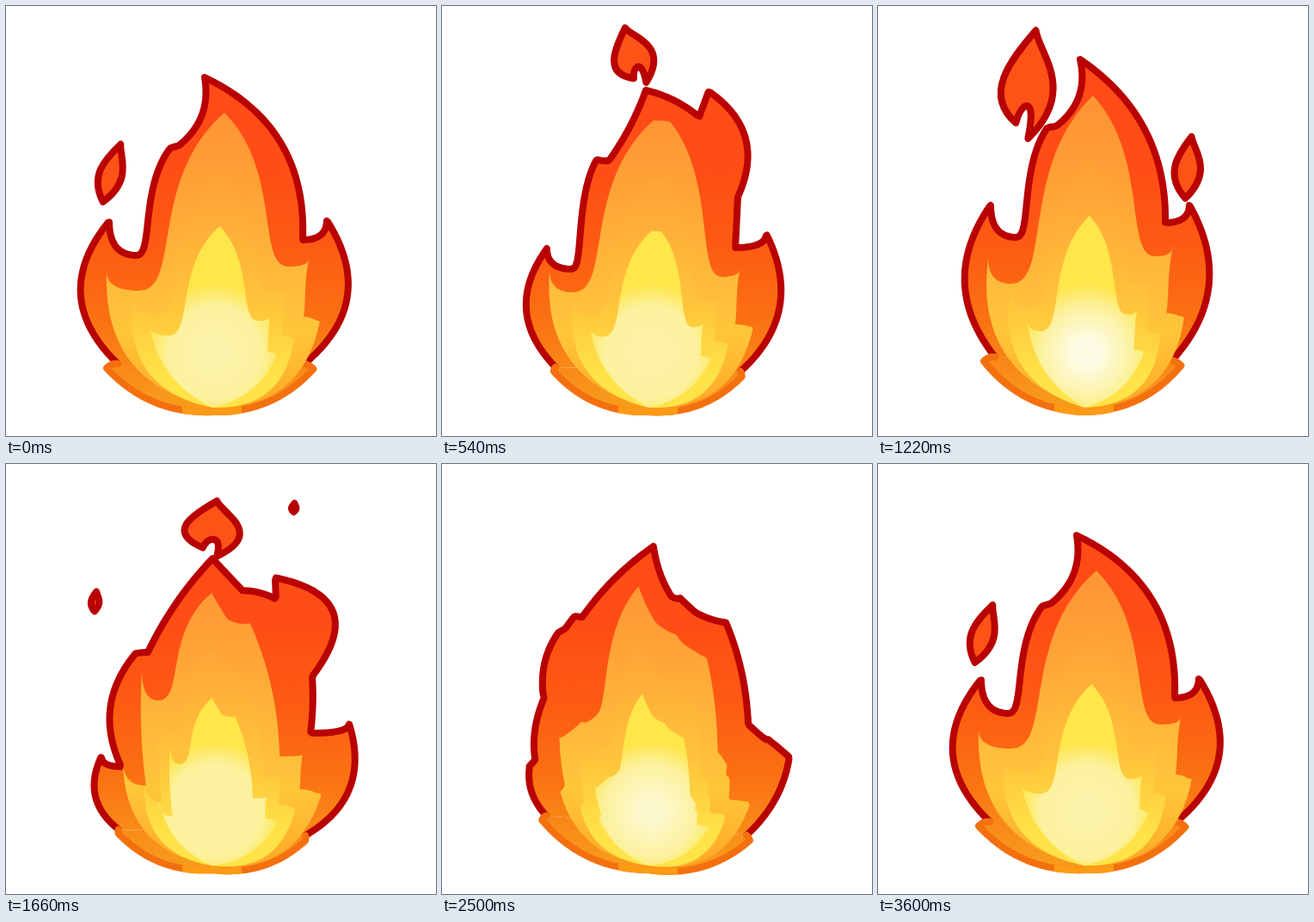
Animation, 500 px wide and 500 px high, one loop 3.62 s. Source, as an HTML page with a canvas:

```html
<!DOCTYPE html>
<html>
<head>
<meta charset="utf-8">
<style>
html, body { margin: 0; width: 100%; height: 100%; overflow: hidden; background: #fff; }
canvas { display: block; width: 500px; height: 500px; }
</style>
</head>
<body>
<canvas id="stage" width="500" height="500"></canvas>
<script>
const ctx = document.getElementById('stage').getContext('2d');
const LOOP = 3620;
const DARK = '#b90202';
const ROOT = [240, 467];
const SAMPLES = 140;

const lerp = (a, b, k) => a + (b - a) * k;
const mix = (p, q, k) => [lerp(p[0], q[0], k), lerp(p[1], q[1], k)];

// Control points of one edge. A given bend bows it outward; otherwise long
// flanks swing up in an S and short ones hook from a tip into a valley.
function controls(a, b, leftSide) {
  const bowed = (x, y) => [mix(a, [x, y], 2 / 3), mix(b, [x, y], 2 / 3)];
  const [x, y, bend] = b;
  if (bend !== undefined) {
    return bowed((a[0] + x) / 2 + bend * (y - a[1]), (a[1] + y) / 2 - bend * (x - a[0]));
  }
  const rising = y < a[1];
  const [low, high] = rising ? [a, b] : [b, a];
  if (rising !== leftSide) return bowed(high[0], low[1]);
  const w = high[0] - low[0], h = high[1] - low[1];
  const swing = [[low[0] + .5 * w, low[1]], [low[0] + .1 * w, low[1] + .63 * h]];
  return rising ? swing : swing.reverse();
}

function cubic(a, c, d, b, k) {
  const m = mix(c, d, k);
  return mix(mix(mix(a, c, k), m, k), mix(m, mix(d, b, k), k), k);
}

function flatten(points, leftSide) {
  const line = [points[0]];
  for (let i = 1; i < points.length; i++) {
    const [c, d] = controls(points[i - 1], points[i], leftSide);
    for (let s = 1; s <= 24; s++) line.push(cubic(points[i - 1], c, d, points[i], s / 24));
  }
  return line;
}

// Evenly spaced points along a line, so that any two outlines can be blended.
function resample(line) {
  const dist = [0];
  for (let i = 1; i < line.length; i++) {
    dist.push(dist[i - 1] + Math.hypot(line[i][0] - line[i - 1][0], line[i][1] - line[i - 1][1]));
  }
  const total = dist[dist.length - 1];
  let j = 1;
  return Array.from({ length: SAMPLES + 1 }, (_, n) => {
    const goal = total * n / SAMPLES;
    while (j < line.length - 1 && dist[j] < goal) j++;
    return mix(line[j - 1], line[j], (goal - dist[j - 1]) / (dist[j] - dist[j - 1]));
  });
}

function outline(points) {
  const top = points.reduce((best, p, i) => p[1] < points[best][1] ? i : best, 0);
  return [
    ...resample(flatten(points.slice(0, top + 1), true)),
    ...resample(flatten(points.slice(top), false))
  ];
}

// The inner flames are one silhouette shrunk towards the root.
function inner(tips, sx, sy, belly) {
  const shrunk = tips.map(([x, y, ...bend]) =>
    [lerp(ROOT[0], x, sx), lerp(ROOT[1], y, sy), ...bend]);
  shrunk[0][2] = belly;
  return outline([ROOT, ...shrunk, [...ROOT, belly]]);
}

// Key points (x, y, optional bend) run from lower left over the top to lower right.
const pose = (time, glow, lobe, body, tips) => ({
  time, glow, lobe,
  body: outline(body),
  mid: inner(tips, 1, 1, .42),
  soft: inner(tips, .76, .8, .45),
  heart: inner(tips, .6, .615, .26)
});

const poses = [
  pose(0, .15, 13,
    [[130, 416], [120, 250, .46], [152, 290], [191, 165], [200, 163], [231, 83, -.3],
     [345, 272, .33], [373, 249], [347, 416, .44]],
    [[117, 309], [155, 331], [254, 124], [328, 303], [353, 292], [345, 361], [365, 366]]),
  pose(540, .1, 2,
    [[132, 420], [122, 282, .42], [151, 306], [180, 178], [194, 180], [237, 98, -.07],
     [299, 129, .12], [310, 99, 0], [344, 222, .42], [341, 281, 0], [377, 265], [347, 425, .38]],
    [[125, 307], [152, 333], [246, 133], [265, 134, 0], [325, 315], [347, 304], [340, 370], [362, 373]]),
  pose(1220, 1, 13,
    [[136, 408], [131, 231, .37], [161, 269], [197, 141], [207, 140], [235, 62, -.32],
     [334, 252, .27], [362, 231], [342, 412, .36]],
    [[128, 293], [155, 323], [250, 104], [322, 291], [344, 277], [334, 357], [356, 361]]),
  pose(1660, 0, 0,
    [[131, 425], [111, 340, .4], [134, 352], [151, 220, .32], [165, 219], [240, 110, .08],
     [275, 147, 0], [314, 157, .12], [313, 132, 0], [356, 247, .8], [354, 313, .05],
     [399, 302], [348, 432, .4]],
    [[136, 345], [163, 374], [158, 240, .05], [177, 275], [239, 150], [257, 180, 0],
     [284, 185, -.2], [318, 340, .1], [345, 338], [341, 378], [367, 383]]),
  pose(2120, .3, 9,
    [[122, 417], [112, 264, .46], [109, 260, 0], [141, 166, .35], [151, 183, 0], [250, 113, .1],
     [290, 200, -.36], [333, 185, -.22], [369, 342, .07], [412, 345, -.03], [362, 435, .12]],
    [[115, 315], [160, 333], [222, 158], [272, 231, -.2], [313, 226], [327, 372, .06],
     [336, 372], [336, 400], [362, 402]]),
  pose(2940, 1, 0,
    [[120, 400], [121, 341, .38], [139, 354], [153, 207, .26], [163, 206, -.1], [241, 76, .1],
     [275, 132, 0], [285, 122], [347, 305, .22], [388, 294], [345, 428, .34]],
    [[148, 372], [168, 378], [160, 262, .05], [182, 275], [236, 124], [257, 165, 0],
     [285, 170, -.2], [313, 333, .1], [337, 338], [330, 380], [355, 382]])
];
poses.push({ ...poses[0], time: 3500 }, { ...poses[0], time: LOOP });

// Loose flames, each described at its fullest moment.
const spark = (time, x, y, w, h, tilt, hook) => ({ time, x, y, w, h, tilt, hook });
const sparks = [
  spark(3610, 123, 196, 28, 70, .3),
  spark(540, 223, 58, 46, 68, -.3, true),
  spark(1220, 176, 91, 60, 126, .12, true),
  spark(1220, 361, 188, 32, 72, .1),
  spark(1660, 335, 51, 6, 10, .1),
  spark(1660, 104, 160, 10, 23, .1),
  spark(1660, 242, 75, 64, 64, .1, true),
  spark(2120, 288, 63, 23, 32, -.1)
];
const SPARK_LIFE = 560, RISE = .16;

function gradient(y0, y1, colours) {
  const g = ctx.createLinearGradient(0, y0, 0, y1);
  colours.forEach((c, i) => g.addColorStop(i / (colours.length - 1), c));
  return g;
}

const bodyFill = gradient(90, 460, ['#ff4b17', '#ff4d15', '#fd5a13', '#fa7212', '#f79a1c']);
const midFill = gradient(120, 465, ['#ff9434', '#ffa136', '#ffb53a', '#ffc63a', '#ffa928']);
const softFill = gradient(190, 430, ['#ffa037', '#ffb239', '#ffc53b', '#ffe347']);

function heartFill(glow) {
  const g = ctx.createRadialGradient(243, 403, 0, 243, 403, 80);
  const centre = `rgb(253,${lerp(241, 252, glow)},${lerp(160, 228, glow)})`;
  g.addColorStop(0, centre);
  g.addColorStop(.2, centre);
  g.addColorStop(.68, '#fcf19d');
  g.addColorStop(1, '#ffe649');
  return g;
}

function trace(points) {
  ctx.beginPath();
  points.forEach(p => ctx.lineTo(...p));
}

function fill(points, colour) {
  trace(points);
  ctx.fillStyle = colour;
  ctx.fill();
}

function stroke(colour) {
  ctx.strokeStyle = colour;
  ctx.lineWidth = 8;
  ctx.stroke();
}

function drawSpark({ time, x, y, w, h, tilt, hook }, t) {
  const age = (t - time + 1.5 * LOOP) % LOOP - LOOP / 2;
  if (Math.abs(age) >= SPARK_LIFE / 2) return;
  const size = Math.sqrt(Math.cos(Math.PI * age / SPARK_LIFE));
  w *= size;
  h *= size;
  ctx.save();
  ctx.translate(x, y - RISE * age);
  ctx.rotate(tilt);
  ctx.beginPath();
  ctx.moveTo(0, -h / 2);
  ctx.bezierCurveTo(w * .1, -h * .3, w * .95, 0, hook ? w * .1 : 0, h / 2);
  if (hook) {
    ctx.quadraticCurveTo(w * .15, h * .2, 0, h * .2);
    ctx.quadraticCurveTo(-w * .12, h * .22, -w * .17, h * .37);
  }
  ctx.bezierCurveTo(-w * .85, h * .15, -w * .45, -h * .18, 0, -h / 2);
  ctx.closePath();
  ctx.fillStyle = '#ff5217';
  ctx.fill();
  stroke(DARK);
  ctx.restore();
}

function drawRim(left, right, lobe) {
  const rim = flatten([
    right, [right[0] + lobe * .8, right[1] + 6, .15], [240, 472, .23],
    [left[0] - lobe, left[1] + 5, .23], [...left, .25]
  ]);
  fill(rim, bodyFill);
  stroke('#f4700f');
  ctx.save();
  const centre = new Path2D();
  centre.rect(205, 455, 69, 30);
  ctx.clip(centre);
  stroke('#ff9a14');
  ctx.restore();
}

function draw(t) {
  ctx.clearRect(0, 0, 500, 500);
  ctx.lineJoin = ctx.lineCap = 'round';
  const next = poses.findIndex(p => p.time > t);
  const a = poses[next - 1], b = poses[next];
  const k = (t - a.time) / (b.time - a.time);
  const morph = layer => a[layer].map((p, i) => mix(p, b[layer][i], k));

  // The early bursts swell sideways between poses.
  const swell = 1 + .07 * Math.max(0, 1 - t / 2200) * Math.sin(Math.PI * k);
  const body = morph('body').map(([x, y]) => [lerp(ROOT[0], x, swell), y]);

  sparks.forEach(s => drawSpark(s, t));
  fill(body, bodyFill);
  stroke(DARK);
  drawRim(body[0], body[body.length - 1], lerp(a.lobe, b.lobe, k));
  fill(morph('mid'), midFill);
  fill(morph('soft'), softFill);
  fill(morph('heart'), heartFill(lerp(a.glow, b.glow, k)));
}

const start = performance.now();
function tick() {
  draw((performance.now() - start) % LOOP);
  requestAnimationFrame(tick);
}
tick();
</script>
</body>
</html>
```
